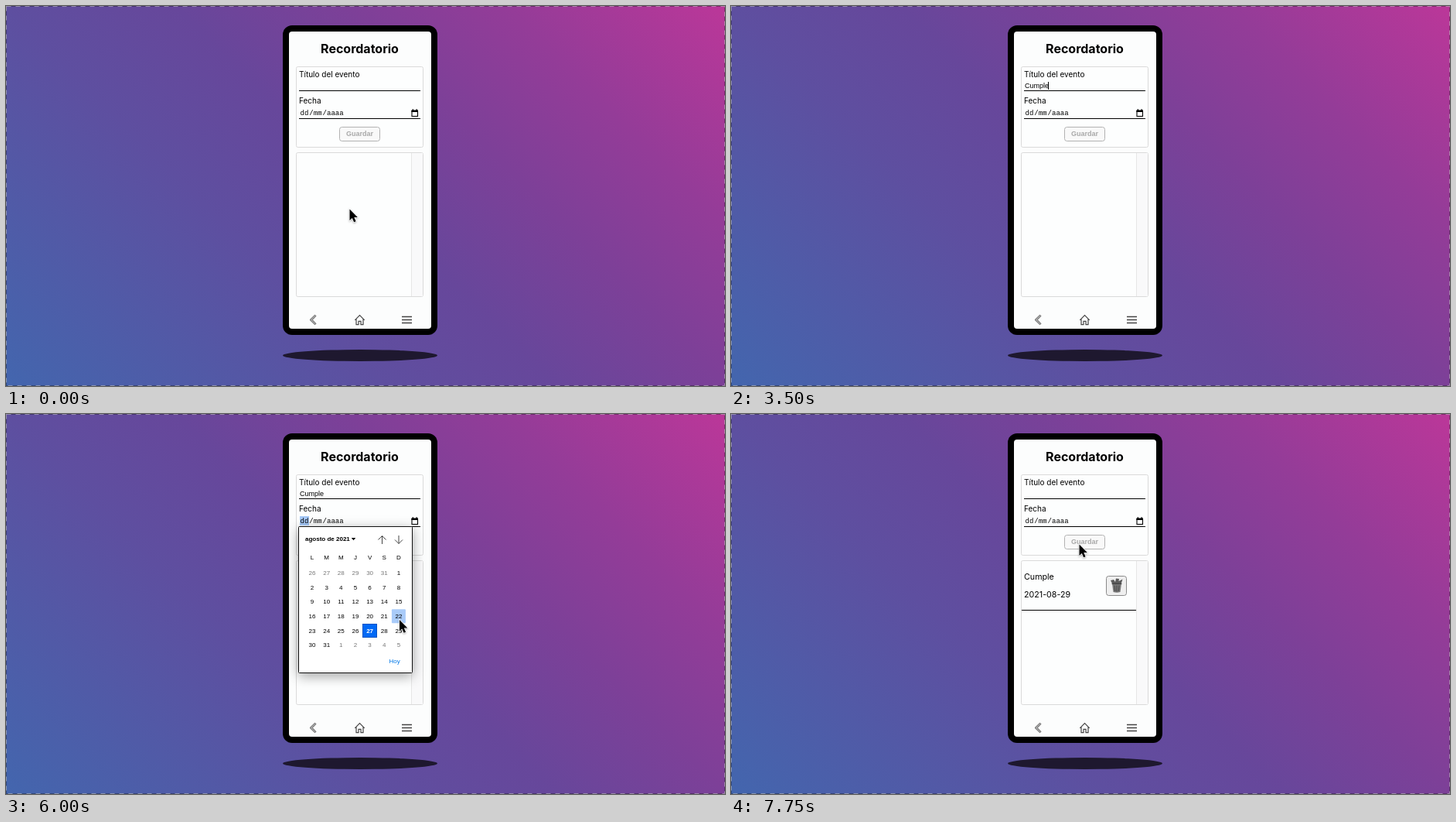
Write an HTML page that moves like this. It is 930 by 491 pixels and loops after 8000 ms.

```html
<!DOCTYPE html>
<html lang="es">
<head>
<meta charset="utf-8">
<title>Recordatorio</title>
<style>
html, body { margin: 0; width: 100%; height: 100%; overflow: hidden; }
body {
  background: linear-gradient(45deg, #4366ae, #5e4fa0 34.5%, #67479b 50%, #7d4098 65.5%, #943c98 80%, #bb3799);
}
svg { display: block; width: 930px; height: 491px; }
.ui { font-family: Inter, sans-serif; }
.ctl { font-family: "Liberation Sans", Arial, sans-serif; }
.mono { font: 9px "Liberation Mono", monospace; }
.bold { font-weight: 700; }
.mid { text-anchor: middle; }
.line { fill: none; stroke: #444; stroke-width: 1.2; }
.pop { filter: drop-shadow(0 4px 8px rgba(0, 0, 0, .36)); }
</style>
</head>
<body>
<svg viewBox="0 0 930 491">
  <g fill="none">
    <rect x=".5" y=".5" width="929" height="490" stroke="#000" stroke-opacity=".3"/>
    <rect x=".5" y=".5" width="929" height="490" stroke="#fff" stroke-opacity=".42" stroke-dasharray="6 6"/>
  </g>
  <ellipse cx="458" cy="451.5" rx="100" ry="7.5" fill="#1e182f"/>
  <rect x="358" y="25" width="200" height="400" rx="12"/>
  <rect x="366" y="33" width="184" height="384" rx="4" fill="#fcfdfd"/>

  <g fill="#fdfefe" stroke="#dadada">
    <rect x="375.5" y="78.5" width="164" height="104" rx="2"/>
    <rect x="375.5" y="189.5" width="164" height="186" rx="2"/>
    <path d="M524.5 190H539V375H524.5Z" fill="#f9f9fa" stroke="none"/>
    <path d="M524.5 190V375" stroke="#e6e6e6"/>
  </g>
  <g class="ui" font-size="10">
    <text class="bold mid" x="457.5" y="61" font-size="16">Recordatorio</text>
    <text x="379" y="92">Título del evento</text>
    <text x="379" y="126">Fecha</text>
  </g>
  <path d="M379 109.5H536M379 145.5H536" stroke="#000"/>
  <text id="field" class="ctl" x="380" y="106" font-size="9"></text>
  <rect id="caret" y="98" width="1" height="10"/>

  <rect id="mark" x="380" y="132" width="12" height="12" fill="#a6c9f8"/>
  <g id="date" class="mono"></g>
  <g>
    <path d="M525 135.5H532.5V142.5H525Z" fill="none" stroke="#000" stroke-width="1.1"/>
    <path d="M524.5 134.5H533V137H524.5ZM525.7 133.3H527V135H525.7ZM530.5 133.3H531.8V135H530.5Z"/>
  </g>

  <rect id="btn" x="431.5" y="156.5" width="52" height="18" rx="3"/>
  <text id="btnText" class="ctl bold mid" x="457.5" y="168" font-size="9">Guardar</text>

  <g id="item">
    <g class="ui" font-size="10.7">
      <text x="379" y="214">Cumple</text>
      <text x="379" y="237">2021-08-29</text>
    </g>
    <path d="M376 253.5H524" stroke="#000"/>
    <rect x="485.5" y="209.5" width="26" height="25" rx="3" fill="#efefef" stroke="#8a8a8a"/>
    <g fill="#777">
      <path d="M493 219H505L503.5 230Q499 231.5 494.5 230Z"/>
      <path d="M491 215L495 214 497 217 498 212.5 502 213 501.5 216 506.5 213.5 504.5 220H493.5Z" fill="#5c5c5c"/>
      <path d="M496 221.5L496.8 229M499 221.5V229.5M502 221.5L501.3 229" stroke="#484848"/>
      <path d="M492.5 219.3H505.5" stroke="#3c3c3c"/>
    </g>
  </g>

  <path d="M399.3 399.4L393 405.5 399.3 411.6 401 410.5 396.3 405.5 401 400.5Z" fill="#aaa" stroke="#555" stroke-width=".9"/>
  <path class="line" d="M451.3 405.8L457.5 399.6 463.7 405.8M453 404.5V411.6H456V407.4H459V411.6H462V404.5"/>
  <path class="line" stroke-width="1.5" d="M512 401.5H525M512 405.5H525M512 409.5H525" style="stroke-width:1.5"/>

  <g id="popup" class="ctl" font-size="8">
    <rect class="pop" x="378.5" y="145.5" width="147" height="189" rx="1" fill="#fff" stroke="#111"/>
    <text class="bold" x="387" y="164">agosto de 2021</text>
    <path d="M446.8 160H452.2L449.5 163.2Z"/>
    <path class="line" style="stroke-width:1" d="M486.5 168V157.5M481.5 162.5L486.5 157.5 491.5 162.5M508 157V167.5M503 162.5L508 167.5 513 162.5"/>
    <rect id="hover" width="18" height="18" rx="1" fill="#a9cbf9"/>
    <rect x="461.5" y="271.5" width="18" height="17" fill="#0069f5" stroke="#0053c4"/>
    <g id="days" class="mid"></g>
    <text x="495.5" y="322" fill="#0078e8">Hoy</text>
  </g>

  <path id="mouse" d="M0 0V14.5L3.3 11.4 5.6 16.8 8.1 15.7 5.8 10.4H10.3Z" stroke="#fff" stroke-width="1.4" paint-order="stroke"
    style="filter:drop-shadow(0 1px 1px rgba(0,0,0,.3))"/>
</svg>
<script>
const $ = id => document.getElementById(id);
const LOOP = 8000, STEP = 18.65, X0 = 396, Y0 = 205;

function addText(parent, x, y, str, attrs = {}) {
  const el = document.createElementNS("http://www.w3.org/2000/svg", "text");
  for (const [k, v] of Object.entries({ x, y, ...attrs })) el.setAttribute(k, v);
  el.textContent = str;
  parent.append(el);
  return el;
}

// Calendar: weekday heads, then six weeks starting on 26 July
[..."LMMJVSD"].forEach((d, i) => addText($("days"), X0 + i * STEP, 188, d));
for (let i = 0; i < 42; i++) {
  const n = i - 5;
  const day = n < 1 ? n + 31 : n > 31 ? n - 31 : n;
  const attrs = n === 27 ? { fill: "#fff", class: "bold" } : { fill: n === day ? "#000" : "#777" };
  addText($("days"), X0 + (i % 7) * STEP, Y0 + 3 + Math.floor(i / 7) * STEP, day, attrs);
}

const parts = [380.5, 392.3, 397.8, 409.5, 415].map(x => addText($("date"), x, 141, ""));

// Each row: time and the values that change then
const steps = [
  [0, { x: 444.5, y: 262.5, mouse: 1, typed: 0, caret: 0, mark: 0, popup: 0, date: 0, item: 0 }],
  [250, { x: 520, y: 240 }],
  [500, { x: 579, y: 178 }],
  [750, { x: 500, y: 128 }],
  [1000, { x: 411.5, y: 105.5 }],
  [1250, { caret: 1 }],
  [1750, { caret: 0 }],
  [2000, { caret: 1, mouse: 0 }],
  [2250, { typed: 1 }],
  [2500, { typed: 2 }],
  [2750, { typed: 3 }],
  [3000, { typed: 4 }],
  [3250, { typed: 5 }],
  [3500, { typed: 6 }],
  [4000, { caret: 0, mouse: 1, x: 418, y: 110 }],
  [4250, { x: 470, y: 125 }],
  [4500, { x: 526, y: 137.5 }],
  [4750, { mark: 1 }],
  [5000, { popup: 1 }],
  [5500, { x: 523, y: 165 }],
  [5750, { x: 515, y: 215 }],
  [6000, { x: 509, y: 266 }],
  [6250, { x: 506.5, y: 286.5 }],
  [6500, { popup: 0, date: 1 }],
  [6750, { x: 490, y: 245 }],
  [7000, { x: 464, y: 195 }],
  [7250, { x: 451.5, y: 171.5 }],
  [7500, { x: 450.5, y: 168.5 }],
  [7750, { typed: 0, date: 0, mark: 0, item: 1 }]
];

const show = (id, on) => $(id).style.display = on ? "" : "none";
const paint = (id, fill, stroke) => {
  $(id).setAttribute("fill", fill);
  if (stroke) $(id).setAttribute("stroke", stroke);
};

function draw(s) {
  for (const id of ["mouse", "caret", "mark", "popup", "item"]) show(id, s[id]);
  $("mouse").setAttribute("transform", `translate(${s.x} ${s.y})`);

  $("field").textContent = "Cumple".slice(0, s.typed);
  $("caret").setAttribute("x", Math.round(380 + (s.typed ? $("field").getComputedTextLength() - .9 : 0)));

  const date = s.date ? "29 / 08 / 2021" : "dd / mm / aaaa";
  date.split(" ").forEach((p, i) => parts[i].textContent = p);

  if (s.date) paint("btn", "#efefef", "#8a8a8a");
  else paint("btn", "#f9f9f9", "#b2b2b2");
  paint("btnText", s.date ? "#000" : "#a9a9a9");

  const col = Math.round((s.x - X0) / STEP), row = Math.round((s.y - Y0) / STEP);
  show("hover", col >= 0 && col < 7 && row >= 0 && row < 6);
  $("hover").setAttribute("x", X0 + col * STEP - 9);
  $("hover").setAttribute("y", Y0 + row * STEP - 8.6);
}

let last = -1;
function tick() {
  const t = performance.now() % LOOP;
  const past = steps.filter(([at]) => at <= t);
  if (past.length !== last) {
    last = past.length;
    draw(Object.assign({}, ...past.map(p => p[1])));
  }
  requestAnimationFrame(tick);
}
tick();
</script>
</body>
</html>
```
